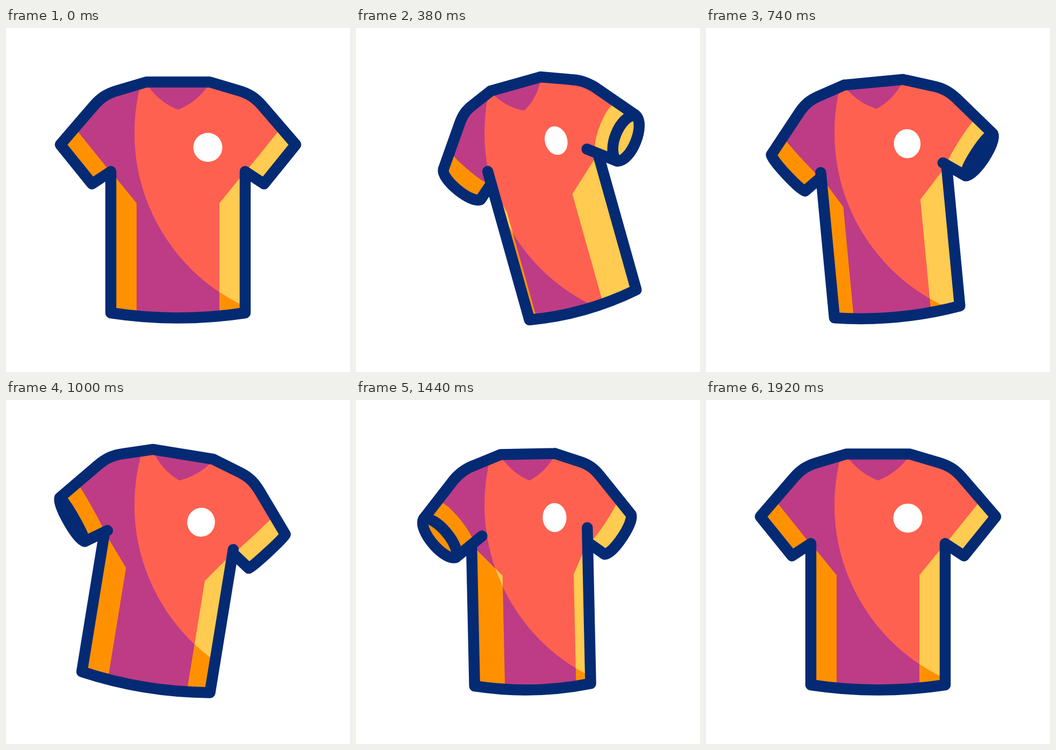
Recreate the animation shown at these times as an HTML page with a canvas. Size 640 by 640 pixels, loop 2.4 s.

```html
<!DOCTYPE html>
<html lang="en">
<head>
<meta charset="utf-8">
<title>Jersey</title>
<style>
  html, body { margin: 0; width: 100%; height: 100%; overflow: hidden; background: #fff; }
  canvas { display: block; width: 640px; height: 640px; }
</style>
</head>
<body>
<canvas id="stage"></canvas>
<script>
const LOOP = 2400;
const NAVY = '#042a74';
const LIGHT = { cloth: '#ff6150', trim: '#ffcb50' };
const DARK = { cloth: '#bd3c85', trim: '#ff9100' };
const PIVOT = [320, 175];
const PIT_Y = 267, HEM_Y = 530, COLLAR_Y = 100.5;
const SIDES = [-1, 1];

// [time, value] pairs, eased with a sine between neighbours
const TILT = [[0, 0], [566, -20.7], [924, 11], [1280, -4.65], [1600, 2.1], [1920, 0]];
const TURN = [[0, 0], [490, 1.13], [895, 0], [1260, -1], [1840, 0]];
const SLIDE = [[740, 0], [960, -3], [1280, 0]];
const DROP = [[0, 2.3], [380, 2.6], [860, 0]];

const canvas = document.getElementById('stage');
const ctx = canvas.getContext('2d');
const ratio = window.devicePixelRatio || 1;
canvas.width = canvas.height = 640 * ratio;

function track(keys, t) {
  if (t <= keys[0][0]) return keys[0][1];
  for (let i = 1; i < keys.length; i++) {
    const [t0, v0] = keys[i - 1], [t1, v1] = keys[i];
    if (t < t1) return v0 + (v1 - v0) * (1 - Math.cos(Math.PI * (t - t0) / (t1 - t0))) / 2;
  }
  return keys[keys.length - 1][1];
}

// Adds a curve from a to b, swelling by h to the normal side
function bow(path, a, b, h) {
  const dx = b[0] - a[0], dy = b[1] - a[1], len = Math.hypot(dx, dy);
  const nx = dy / len * h / 0.75, ny = -dx / len * h / 0.75;
  path.bezierCurveTo(
    a[0] + dx * 0.1 + nx, a[1] + dy * 0.1 + ny,
    a[0] + dx * 0.9 + nx, a[1] + dy * 0.9 + ny, b[0], b[1]);
}

function polygon(points) {
  const path = new Path2D();
  points.forEach((p, i) => i ? path.lineTo(...p) : path.moveTo(...p));
  path.closePath();
  return path;
}

// Points of one side of the shirt for a given turn
function sidePoints(side, turn) {
  const q = Math.abs(turn);
  const near = turn * side > 0;
  const lift = q * (turn > 0 ? 1 : 1.45);
  const sag = near ? 3 * q : 0;
  const x = (dx, loss, right, left) =>
    320 + side * dx * (1 - loss * q) + q * (turn > 0 ? right : left);

  const body = x(125, 0.175, 6.2, 1.2);
  const tip = [x(219, 0.152, 10.5, -3), 217];
  const inner = [x(160, 0.175, 8, 2), 290];
  const pit = near
    ? [body - side * 17.5 * lift, PIT_Y - 14 * lift]
    : [body, PIT_Y - 24 * lift];
  const slope = (pit[1] - inner[1]) / (pit[0] - inner[0]);
  const join = [body, near ? inner[1] + slope * (body - inner[0]) : PIT_Y];

  return {
    side, q, near, tip, inner, pit, join, body,
    collar: [x(59, 0.185, -3, 1.5), COLLAR_Y],
    shoulder: [
      [x(113, 0.18, 3, 0), 116.5 + sag], [x(132, 0.175, 4.5, -0.5), 122 + sag],
      [x(144, 0.172, 5, -1), 130 + sag], [x(157, 0.17, 6, -1), 145]],
    corner: [body, HEM_Y],
    stripe: x(77, 0.18, -20, 20),
    swell: side * (near ? 18.5 * Math.sqrt(q) : 13 * q),
    mouth: -side * 21 * q
  };
}

function traceSleeve(path, s) {
  const [a, b, c, d] = s.shoulder;
  path.lineTo(...a);
  path.bezierCurveTo(...b, ...c, ...d);
  path.lineTo(...s.tip);
  bow(path, s.tip, s.inner, s.swell);
}

function traceHem(path, from, to) {
  path.quadraticCurveTo((from[0] + to[0]) / 2, HEM_Y + 19, ...to);
}

function halfShape(s, other) {
  const path = new Path2D();
  path.moveTo(...other.collar);
  path.lineTo(...s.collar);
  traceSleeve(path, s);
  path.lineTo(...s.join);
  path.lineTo(...s.corner);
  traceHem(path, s.corner, other.corner);
  path.closePath();
  return path;
}

function cuffShape(s) {
  const { side, q, near, tip, inner } = s;
  const a = [tip[0] - side * (33 + (near ? 4 : -7) * q), tip[1] - 24];
  const b = [inner[0] - side * (28 + (near ? 1 : -8) * q), inner[1] - 30];
  const len = Math.hypot(b[0] - a[0], b[1] - a[1]);
  const ex = (b[0] - a[0]) / len * 8, ey = (b[1] - a[1]) / len * 8;
  const start = [a[0] - ex, a[1] - ey], end = [b[0] + ex, b[1] + ey];
  const path = new Path2D();
  path.moveTo(...start);
  bow(path, start, end, side * (near ? -12 : 6) * q);
  path.lineTo(...inner);
  bow(path, inner, tip, -s.swell);
  path.closePath();
  return path;
}

function stripeShape(s) {
  return polygon([[s.body, PIT_Y], [s.stripe, 326], [s.stripe, HEM_Y + 4], s.corner]);
}

function outline(left, right) {
  const path = new Path2D();
  for (const s of [left, right]) {
    path.moveTo(...s.collar);
    traceSleeve(path, s);
    path.lineTo(...(s.near ? s.pit : s.join));
    path.moveTo(...(s.near ? s.join : s.pit));
    path.lineTo(...s.corner);
    if (s.near) {
      path.moveTo(...s.tip);
      bow(path, s.tip, s.inner, s.mouth);
    }
  }
  path.moveTo(...left.collar);
  path.lineTo(...right.collar);
  path.moveTo(...left.corner);
  traceHem(path, left.corner, right.corner);
  return path;
}

function neckShape(left, right, x, y) {
  const l = left.collar[0] - 2, r = right.collar[0] + 2;
  const path = new Path2D();
  path.moveTo(l, COLLAR_Y);
  path.quadraticCurveTo(x + (l - x) * 0.6, y - 14, x, y);
  path.quadraticCurveTo(x + (r - x) * 0.6, y - 14, r, COLLAR_Y);
  path.closePath();
  return path;
}

function draw(t) {
  const turn = track(TURN, t), q = Math.abs(turn), drop = track(DROP, t);
  const [left, right] = SIDES.map(side => sidePoints(side, turn));
  const cloth = [halfShape(left, right), halfShape(right, left)];
  const trim = [left, right].flatMap(s => [cuffShape(s), stripeShape(s)]);

  const pose = () => {
    ctx.translate(...PIVOT);
    ctx.rotate(track(TILT, t) * Math.PI / 180);
    ctx.translate(track(SLIDE, t) - PIVOT[0], -PIVOT[1]);
  };
  const paint = colors => {
    ctx.fillStyle = colors.cloth;
    cloth.forEach(p => ctx.fill(p));
    ctx.fillStyle = colors.trim;
    trim.forEach(p => ctx.fill(p));
  };

  ctx.setTransform(ratio, 0, 0, ratio, 0, 0);
  ctx.fillStyle = '#fff';
  ctx.fillRect(0, 0, 640, 640);

  ctx.save();
  pose();
  paint(DARK);
  ctx.restore();

  // The lit area stays put while the shirt moves through it
  ctx.save();
  ctx.beginPath();
  ctx.arc(596, 195, 357, 0, Math.PI * 2);
  ctx.clip();
  pose();
  paint(LIGHT);
  ctx.restore();

  ctx.save();
  pose();
  ctx.fillStyle = DARK.cloth;
  ctx.fill(neckShape(left, right, 320 + (turn > 0 ? -1 : 4) * q, 149.7 + drop));

  ctx.fillStyle = '#fff';
  ctx.beginPath();
  ctx.ellipse(375.5 - (turn > 0 ? 14.5 : 9) * q, 219.8 + drop,
    27 * (1 - 0.23 * q), 27, 0, 0, Math.PI * 2);
  ctx.fill();

  ctx.strokeStyle = NAVY;
  ctx.lineWidth = 20.5;
  ctx.lineCap = ctx.lineJoin = 'round';
  ctx.stroke(outline(left, right));
  ctx.restore();
}

const start = performance.now();
function tick() {
  draw((performance.now() - start) % LOOP);
  requestAnimationFrame(tick);
}
tick();
</script>
</body>
</html>
```
